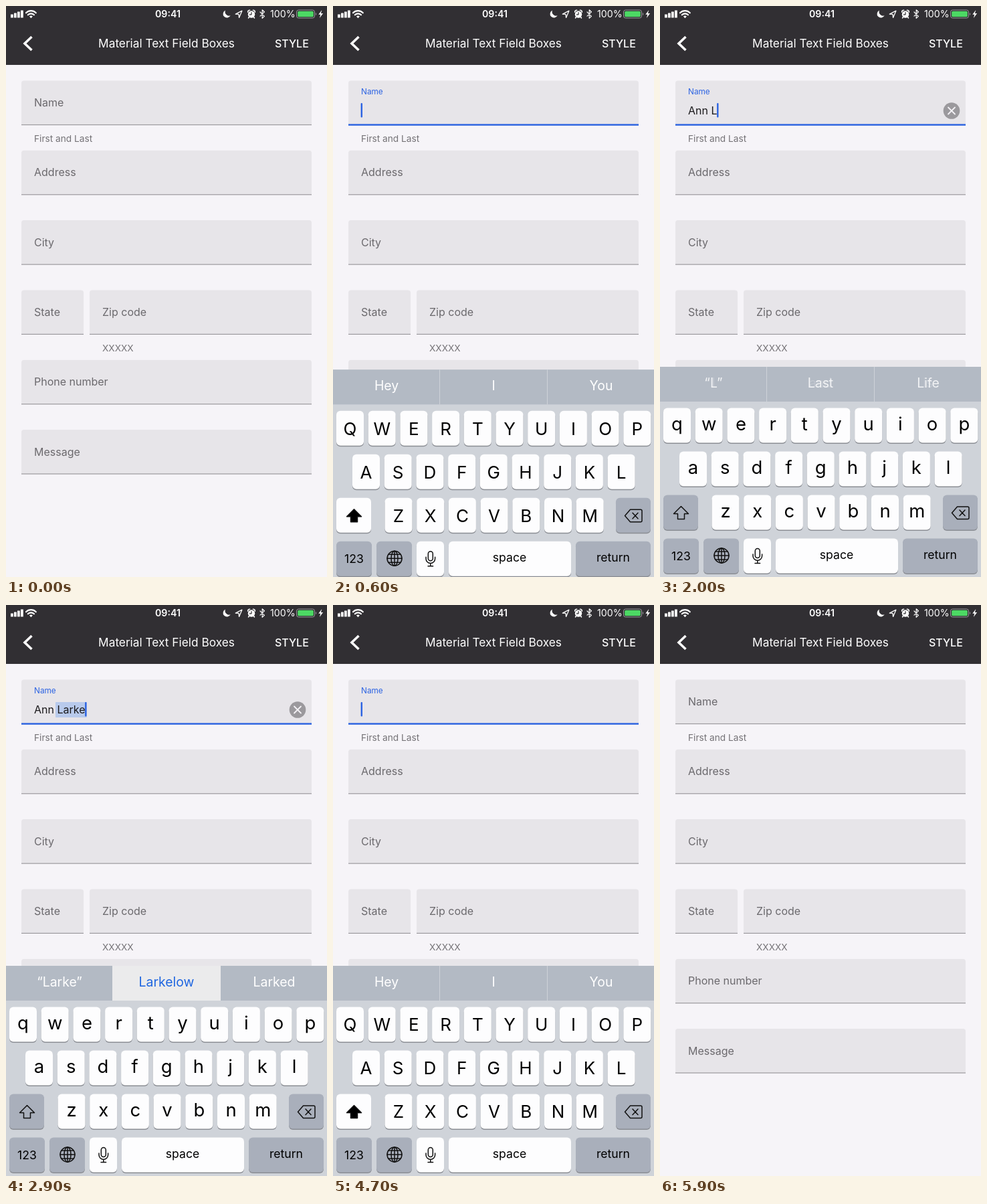
An HTML page that plays this animation: 480 px wide and 853 px high, repeating every 6000 ms.

```html
<!DOCTYPE html>
<html lang="en">
<head>
<meta charset="utf-8">
<title>Text field boxes</title>
<style>
  html, body { margin: 0; width: 100%; height: 100%; overflow: hidden; background: #f6f4f8; }
  svg { display: block; width: 480px; height: 853px; font-family: Inter, "Open Sans", sans-serif; }
  text { white-space: pre; }
  .mid { text-anchor: middle; }
  .line { fill: none; stroke-linecap: round; stroke-linejoin: round; }
  .label { font-size: 16px; fill: #6b696d; }
  .hint { font-size: 13.7px; fill: #747276; }
  .word { font-size: 19.4px; text-anchor: middle; }
  .cap { font-size: 17.6px; text-anchor: middle; }
  #upper { font-size: 26px; text-anchor: middle; }
  #lower { font-size: 27.5px; text-anchor: middle; }
</style>
</head>
<body>
<svg viewBox="0 0 480 853">
  <rect width="480" height="853" fill="#f6f4f8"/>
  <g id="form"></g>
  <rect id="underline" x="23" y="176.3" width="434" height="2.4" fill="#2c63e2"/>
  <text id="name" x="42">Name</text>
  <rect id="mark" y="145" height="23" rx="1" fill="#b8caec"/>
  <text id="entry" x="42" y="161.7" font-size="16" fill="#1b1a1c"></text>
  <rect id="caret" y="145" width="2.4" height="21.5" rx="1" fill="#2c63e2"/>
  <g id="clear">
    <circle cx="436" cy="156.5" r="12.3" fill="#9b999d"/>
    <path class="line" d="M431 151.5l10 10m0-10l-10 10" stroke="#f4f2f6" stroke-width="1.8"/>
  </g>

  <rect width="480" height="88" fill="#312f33"/>
  <g fill="#fff">
    <path d="M7 12.5h3.8v5H7zM12 10.5h3.8v7H12zM17 8.5h3.8v9H17zM22 6.5h3.8v11H22z"/>
    <path class="line" d="M30 10.3a10.3 10.3 0 0 1 14.8 0M32.8 13.3a6.4 6.4 0 0 1 9.2 0" stroke="#fff" stroke-width="2.2"/>
    <path d="M37.4 18.2l-2.5-2.6a3.6 3.6 0 0 1 5 0z"/>
    <text class="mid" x="242" y="17" font-size="14.2" font-weight="600">09:41</text>
    <path d="M328 6.5a5.8 5.8 0 1 0 7.6 7.8a6 6 0 0 1-7.6-7.8z"/>
    <path class="line" d="M343.3 12.2l9.6-5-4.3 10.2-.6-5z" stroke="#fff" stroke-width="1.3"/>
    <circle cx="367" cy="12.5" r="5.2"/>
    <path class="line" d="M361.6 9.2a3 3 0 0 1 3-3M372.4 9.2a3 3 0 0 0-3-3M363.5 16.5l-1 1.5M370.5 16.5l1 1.5" stroke="#fff" stroke-width="1.5"/>
    <path class="line" d="M367 9.5v3.3h-2.7" stroke="#312f33" stroke-width="1.2"/>
    <path class="line" d="M380 9l6.4 6.4-3.2 3V5.800l3.200 3-6.400 6.400" stroke="#fff" stroke-width="1.2"/>
    <text x="395" y="17" font-size="14.2">100%</text>
    <rect x="434.500" y="6" width="27" height="12" rx="3" fill="none" stroke="#98969a"/>
    <rect x="436.200" y="7.700" width="23.600" height="8.600" rx="1.600" fill="#4cd964"/>
    <path d="M463 10a2.300 2.300 0 0 1 0 4z" fill="#98969a"/>
    <path d="M472.300 6l-5 6.800h3l-1.400 5.200 5.200-7h-3.200z"/>
    <path d="M38.500 46l-10.500 10 10.500 10" fill="none" stroke="#fff" stroke-width="3.600"/>
    <text class="mid" x="240" y="62.300" font-size="17.300">Material Text Field Boxes</text>
    <text x="402" y="62.300" font-size="16" font-weight="500">STYLE</text>
  </g>

  <g id="keyboard">
    <rect y="539" width="480" height="330" fill="#cfd3d9"/>
    <rect y="539" width="480" height="52" fill="#b3bac4"/>
    <path d="M159.500 539v52M320.500 539v52" stroke="#cdd2d8"/>
    <rect id="pick" x="159" y="539" width="162" height="52" fill="#ebebec"/>
    <g id="words"></g>
    <g id="keys"></g>
    <g id="upper"></g>
    <g id="lower"></g>
    <path id="shift" d="M31.500 747.500l11 11h-6v8h-10v-8h-6z" stroke="#111" stroke-width="1.500" stroke-linejoin="round"/>
    <g class="line" stroke="#111" stroke-width="1.500">
      <path d="M444.500 748h15.500a2 2 0 0 1 2 2v14.500a2 2 0 0 1-2 2h-15.500l-8-9.200zM448 753l8 8.500m0-8.500l-8 8.500"/>
      <circle cx="92" cy="821" r="11"/>
      <ellipse cx="92" cy="821" rx="5" ry="11"/>
      <path d="M92 810v22M81 821h22M83.500 815h17M83.500 827h17"/>
      <rect x="142.300" y="810.500" width="7" height="14" rx="3.500"/>
      <path d="M139 819v2.500a6.800 6.800 0 0 0 13.600 0V819M145.800 828.500v4M142 832.500h7.600"/>
    </g>
    <text class="cap" x="31.500" y="827.500">123</text>
    <text class="cap" x="264" y="826">space</text>
    <text class="cap" x="419" y="826">return</text>
  </g>
</svg>
<script>
const $ = id => document.getElementById(id);
const LOOP = 6000, STEP = 100, FOCUS = 120, BLUR = 5040;
const WHITE = '#fdfdfe', GREY = '#a9afbb';
const ROWS = [['qwertyuiop', 5], ['asdfghjkl', 29], ['zxcvbnm', 77.5]];

// [time, text in the field]
const ENTRIES = [[0, ''], [950, 'A'], [1100, 'An'], [1350, 'Ann'], [1650, 'Ann '], [1920, 'Ann L'],
  [2250, 'Ann La'], [2450, 'Ann Lar'], [2650, 'Ann Lark'], [2850, 'Ann Larke'],
  [3100, 'Ann Larkel'], [3300, 'Ann Larkelo'], [3500, 'Ann Larkelow'], [4350, '']];

// [time, three suggestions, whether the middle one is picked]
const WORDS = [[0, 'Hey I You'], [1050, '“A” And Are'], [1450, '“Ann” Any And'], [1680, 'I and is'],
  [1850, '“L” Last Life'], [2350, '“La” Last Late'], [2550, '“Lar” Large Lark'],
  [2720, '“Larke” Larkelow Larked', true], [3550, '“Larkelow” Larks Larked'], [4400, 'Hey I You']];

function field(x, y, width, label) {
  return `<path d="M${x} ${y + 66}v-62a4 4 0 0 1 4-4h${width - 8}a4 4 0 0 1 4 4v62z" fill="#e7e5e9"/>
    <rect x="${x}" y="${y + 65.4}" width="${width}" height="1.2" fill="#9c9a9e"/>
    <text class="label" x="${x + 19}" y="${y + 38.6}">${label}</text>`;
}

function key(x, y, width, fill, id = '') {
  const shape = `x="${x}" width="${width}" height="52" rx="6"`;
  return `<rect ${shape} y="${y + 1.4}" fill="#8b8e94"/><rect id="${id}" ${shape} y="${y}" fill="${fill}"/>`;
}

function build() {
  const top = i => 111.5 + 104.3 * i;
  $('form').innerHTML = ['', 'Address', 'City', 'State', 'Phone number', 'Message']
    .map((label, i) => field(23, top(i), i === 3 ? 93 : 434, label)).join('')
    + field(125, top(3), 332, 'Zip code')
    + '<text class="hint" x="42" y="203">First and Last</text><text class="hint" x="144" y="516">XXXXX</text>';

  let keys = '', upper = '', lower = '';
  ROWS.forEach(([letters, left], row) => [...letters].forEach((letter, i) => {
    const x = left + 47.7 * i, y = 600.5 + 65 * row;
    keys += key(x, y, 41, WHITE);
    upper += `<text x="${x + 20.5}" y="${y + 35.800}">${letter.toUpperCase()}</text>`;
    lower += `<text x="${x + 20.5}" y="${y + 33.800}">${letter}</text>`;
  }));
  keys += key(5, 730.5, 52, WHITE, 'shiftKey') + key(423, 730.5, 52, GREY)
    + key(5, 795.5, 53, GREY) + key(65, 795.5, 53, GREY) + key(125, 795.5, 41, WHITE)
    + key(173, 795.5, 183, WHITE) + key(363, 795.5, 112, GREY);
  $('keys').innerHTML = keys;
  $('upper').innerHTML = upper;
  $('lower').innerHTML = lower;
}

const clamp = v => Math.min(1, Math.max(0, v));
const smooth = v => v * v * (3 - 2 * v);
const spring = ms => ms <= 0 ? 0 : 1 - (1 + 0.0131 * ms) * Math.exp(-0.0131 * ms);
const set = (id, attrs) => { for (const k in attrs) $(id).setAttribute(k, attrs[k]); };
const show = (id, on) => set(id, { display: on ? 'inline' : 'none' });

function suggestions([, line, picked], opacity) {
  return line.split(' ').map((word, i) =>
    `<text class="word" x="${[80, 240, 401][i]}" y="570" opacity="${opacity}"
      fill="${picked && i === 1 ? '#1f66e0' : '#fff'}">${word}</text>`).join('');
}

function draw(t) {
  const focus = smooth(clamp((t - FOCUS) / 180)) * (1 - smooth(clamp((t - BLUR) / 180)));
  const focused = t > FOCUS && t < BLUR;
  const mix = (a, b) => a + (b - a) * focus;
  set('name', { y: mix(150.1, 132.4), 'font-size': mix(16, 11.8),
    fill: `rgb(${mix(107, 44)},${mix(105, 99)},${mix(109, 226)})` });
  set('underline', { opacity: focus });

  const text = ENTRIES.findLast(e => e[0] <= t)[1];
  const entry = $('entry');
  entry.textContent = text;
  const end = 41.6 + (text ? entry.getComputedTextLength() : 0);
  set('caret', { x: end });
  show('caret', focused);
  show('clear', text);

  const at = WORDS.findLastIndex(w => w[0] <= t), current = WORDS[at];
  const fade = at ? clamp((t - current[0]) / 180) : 1;
  $('words').innerHTML = (fade < 1 ? suggestions(WORDS[at - 1], 1 - fade) : '') + suggestions(current, fade);
  show('pick', current[2]);
  show('mark', current[2] && text.length > 8);
  if (text.length > 4) {
    const start = 39.5 + entry.getSubStringLength(0, 4);
    set('mark', { x: start, width: end + 2.8 - start });
  }

  const capital = !text || (t >= 1750 && t < 1920);
  show('upper', capital);
  show('lower', !capital);
  set('shiftKey', { fill: capital ? WHITE : GREY });
  set('shift', { fill: capital ? '#000' : 'none' });

  const raised = spring(t - FOCUS) - spring(t - BLUR);
  set('keyboard', { transform: `translate(0 ${314 * (1 - raised)})` });
  show('keyboard', raised > 0.003);
}

build();
const begin = performance.now();
function frame() {
  const t = (performance.now() - begin) % LOOP;
  draw(Math.floor(t / STEP) * STEP);
  requestAnimationFrame(frame);
}
frame();
</script>
</body>
</html>
```
